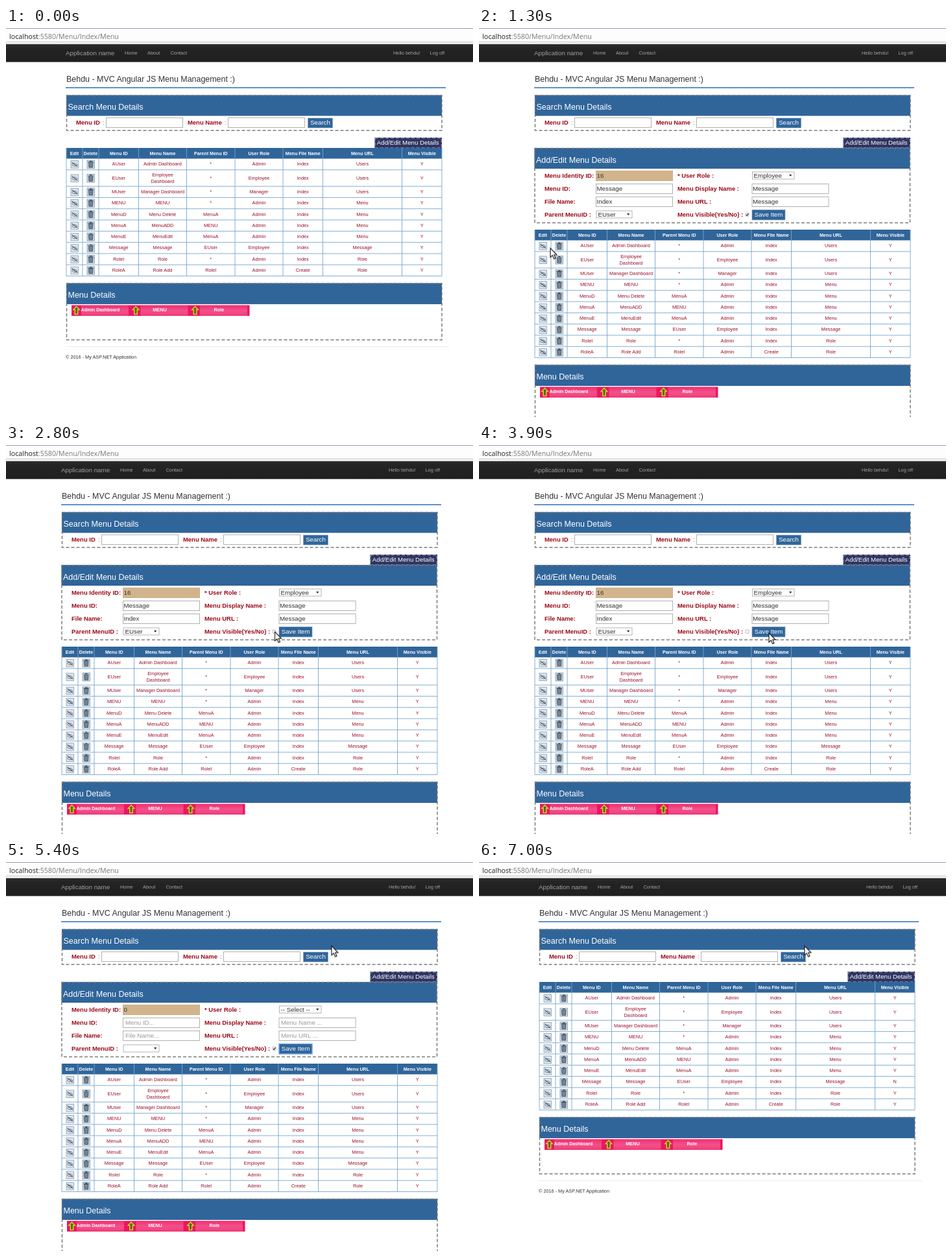
Write an HTML page that moves like this. It is 720x600 px and loops after 7100 ms.

```html
<!DOCTYPE html>
<html lang="en">
<head>
<meta charset="utf-8">
<title>Menu Management</title>
<style>
html, body { margin: 0; width: 100%; height: 100%; overflow: hidden; background: #fff; }
svg { display: block; width: 720px; height: 600px; font-family: "Liberation Sans", Arial, sans-serif; }
text { white-space: pre; }
.ui { font-family: "Open Sans", "Noto Sans CJK KR", "Noto Sans CJK JP", "Noto Sans CJK", sans-serif; }
.ko { font-family: "Noto Sans CJK KR", "Noto Sans CJK JP", "Noto Sans CJK", sans-serif; }
.b { font-weight: bold; }
.page, .lower, .form, .filled, .blank, .tick, .focus, .alert, .yes, .no { animation: 7.1s step-end infinite; }
.page { animation-name: page; }
.lower { animation-name: lower; }
.form { animation-name: form; }
.filled { animation-name: filled; }
.blank { animation-name: blank; }
.tick { animation-name: tick; }
.focus { animation-name: focus; }
.alert { animation-name: alert; }
.yes { animation-name: yes; }
.no { animation-name: no; }
.cursor { animation: cursor 7.1s ease-in-out infinite, enter 7.1s step-end infinite; }
@keyframes page { 0%, 77.3% { transform: none } 18.2% { transform: translate(-7px, 0) } }
@keyframes lower { 0%, 77.3% { transform: none } 18.2% { transform: translate(0, 126px) } }
@keyframes form { 0%, 77.3% { opacity: 0 } 18.2% { opacity: 1 } }
@keyframes filled { 0% { opacity: 1 } 74.5% { opacity: 0 } }
@keyframes blank { 0% { opacity: 0 } 74.5% { opacity: 1 } }
@keyframes tick { 0%, 74.5% { opacity: 1 } 37.9% { opacity: 0 } }
@keyframes focus { 0% { opacity: 0 } 57.6% { opacity: 1 } }
@keyframes alert { 0%, 74.5% { opacity: 0 } 59% { opacity: 1 } }
@keyframes yes { 0% { opacity: 1 } 77.3% { opacity: 0 } }
@keyframes no { 0% { opacity: 0 } 77.3% { opacity: 1 } }
@keyframes enter { 0% { opacity: 0 } 7% { opacity: 1 } }
@keyframes cursor {
  0%, 7% { transform: translate(240px, 600px) }
  15%, 22% { transform: translate(110px, 339.5px) }
  36%, 41.5% { transform: translate(414.5px, 288px) }
  50%, 62.5% { transform: translate(447px, 290px) }
  72%, 100% { transform: translate(502px, 129.5px) }
}
</style>
</head>
<body>
<script>
const BLUE = '#30659a', RED = '#9b0f2c', LABEL = '#9c0a18', NAVY = '#2f3562';

const attrs = o => Object.entries(o).map(([k, v]) => ` ${k}="${v}"`).join('');
const rect = (x, y, width, height, fill, more = {}) =>
  `<rect${attrs({ x, y, width, height, fill, ...more })}/>`;
const path = (d, stroke, w = 1, fill = 'none') =>
  `<path${attrs({ d, stroke, 'stroke-width': w, fill })}/>`;
const text = (x, y, s, size, fill, more = {}) =>
  `<text${attrs({ x, y, 'font-size': size, fill, ...more })}>${s}</text>`;
const group = (cls, ...parts) => `<g class="${cls}">${parts.join('')}</g>`;
const mid = { 'text-anchor': 'middle' }, bold = { class: 'b' };

const dashed = (x, y, w, h, color = '#7b7b7b') => rect(x, y, w, h, 'none',
  { stroke: color, 'stroke-width': 1.5, 'stroke-dasharray': '5 3' });
const panel = (x, y, h, title, head = 32) =>
  rect(x, y, 579, head, BLUE) + dashed(x + .5, y + .5, 578.5, h) +
  text(x + 2.5, y + 22.5, title, 12.5, '#fff');
const label = (x, y, s) => text(x, y, s, 9.45, LABEL, bold);
const input = (x, y, fill = '#fff') =>
  rect(x + .5, y + .5, 118, 15, fill, { stroke: fill === '#fff' ? '#b0b0b0' : '#cbb08c' });
const select = (x, y, w) =>
  rect(x + .5, y + .5, w, 11, '#fff', { stroke: '#b4b4b4' }) +
  path(`M${x + w - 7.5} ${y + 4.5}h4.4l-2.2 3z`, 'none', 0, '#333');
const button = (x, y, w, h, s) =>
  rect(x, y, w, h, BLUE, { stroke: '#7d9fc2', 'stroke-width': .7 }) +
  text(x + w / 2, y + 10.4, s, 9.7, '#fff', mid);

function addressBar() {
  return rect(0, 0, 720, 22, '#fdfdfd') + rect(0, 0, 720, 1.2, '#a9a3b8') +
    rect(0, 20.5, 720, 1, '#cfcfd6') + rect(0, 21.5, 720, 3.5, '#e9e9ea') +
    text(5, 17, 'localhost<tspan fill="#777">:5580/Menu/Index/Menu</tspan>', 10.7, '#222', { class: 'ui' }) +
    rect(0, 25, 720, 27.5, 'url(#nav)');
}

function pageHead() {
  const link = (x, s) => text(x, 41, s, 7.4, '#a3a3a3');
  return text(92, 41.5, 'Application name', 9.8, '#a0a0a0') +
    link(183, 'Home') + link(218, 'About') + link(253.5, 'Contact') +
    link(597, 'Hello behdu!') + link(653.5, 'Log off') +
    text(93, 82.5, 'Behdu - MVC Angular JS Menu Management :)', 12.45, '#333') +
    rect(92, 91.2, 586, 1.8, '#5186c4') +
    panel(93, 103.5, 54, 'Search Menu Details') +
    label(108, 149.3, 'Menu ID') + text(149, 149.3, ':', 9.5, '#777') + input(154, 138) +
    label(280, 149.3, 'Menu Name') + text(337, 149.3, ':', 9.5, '#777') + input(342, 138) +
    button(465.5, 139, 38, 15, 'Search') +
    rect(568.5, 169, 103.5, 16, NAVY) + dashed(569, 169.5, 102.5, 15.5, '#8f93a8') +
    text(571.8, 179.8, 'Add/Edit Menu Details', 9.7, '#fff');
}

const columns = [93, 118, 143, 204.5, 278.5, 353, 427, 488.5, 610.5, 672];
const centers = columns.slice(1).map((x, i) => (x + columns[i]) / 2);
const heads = ['Edit', 'Delete', 'Menu ID', 'Menu Name', 'Parent Menu ID', 'User Role',
  'Menu File Name', 'Menu URL', 'Menu Visible'];
const rows = [
  'AUser|Admin Dashboard|*|Admin|Index|Users',
  'EUser|Employee/Dashboard|*|Employee|Index|Users',
  'MUser|Manager Dashboard|*|Manager|Index|Users',
  'MENU|MENU|*|Admin|Index|Menu',
  'MenuD|Menu Delete|MenuA|Admin|Index|Menu',
  'MenuA|MenuADD|MENU|Admin|Index|Menu',
  'MenuE|MenuEdit|MenuA|Admin|Index|Menu',
  'Message|Message|EUser|Employee|Index|Message',
  'RoleI|Role|*|Admin|Index|Role',
  'RoleA|Role Add|RoleI|Admin|Create|Role'
].map(r => r.split('|'));

const editIcon = (x, y) => `<g transform="translate(${x} ${y})">` +
  rect(-5.5, -5.5, 11.5, 11.5, '#dce4ec', { stroke: '#93a3b3', 'stroke-width': .9 }) +
  path('M-4 .8Q0-4 4.5 1Q0 5-4 .8', '#65788c', 1) + path('M-4-3L4.5 3.5', '#4c6075', 1.3) + '</g>';
const binIcon = (x, y) => `<g transform="translate(${x} ${y})">` +
  rect(-5.5, -6, 11.5, 12.5, '#cdd8e2', { stroke: '#93a3b3', 'stroke-width': .9 }) +
  path('M-4-3.5H4.5M-1.5-4.8H2', '#43566a', 1.2) +
  path('M-3-2.2H3.5L3 4.8H-2.5Z', '#43566a', 1, '#8c9cac') + path('M-.8-1V4M1.4-1V4', '#43566a', .8) + '</g>';

function menuTable() {
  let y = 201.5, out = rect(93, 185, 579, 16.5, BLUE), lines = '';
  heads.forEach((h, i) => out += text(centers[i], 195.6, h, 7.1, '#fff', { ...mid, ...bold }));
  rows.forEach((row, n) => {
    const h = n === 1 ? 25.4 : 17.29, c = y + h / 2;
    const cell = (i, dy, s, more) => text(centers[i], c + 2.2 + dy, s, 7.35, RED, { ...mid, ...more });
    out += editIcon(centers[0], c) + binIcon(centers[1], c);
    row.forEach((s, i) => {
      const parts = s.split('/');
      parts.forEach((p, k) => out += cell(i + 2, (k - (parts.length - 1) / 2) * 10, p));
    });
    out += row[0] === 'Message'
      ? cell(8, 0, 'Y', { class: 'yes' }) + cell(8, 0, 'N', { class: 'no' })
      : cell(8, 0, 'Y');
    y += h;
    lines += `M93 ${y}H672`;
  });
  columns.forEach(x => lines += `M${x} 185V${y}`);
  return out + path(lines, '#78a5cf', .9);
}

function menuPanel() {
  let out = panel(93, 393.5, 87, 'Menu Details', 32.5) + rect(101, 427.5, 274.5, 16.5, '#ec1561');
  ['Admin Dashboard', 'MENU', 'Role'].forEach((s, i) => {
    const x = 101 + i * 91.5;
    out += rect(x + 15, 428, 73, 15.5, 'url(#pink)') +
      path(`M${x + 7.5} 429.5l4.7 5h-2.5v7h-4.4v-7h-2.5z`, '#bfdc1c', 1.5, '#6d5a1c') +
      text(x + 44.5, 436.8, s, i ? 7.3 : 6.9, '#fff', { ...mid, ...bold });
  });
  return out + rect(92, 491, 591, .8, '#e6e6e6') +
    text(92, 510, '© 2016 - My ASP.NET Application', 7.3, '#333');
}

function editForm() {
  const val = (x, y, s) => text(x, y, s, 9.75, '#333');
  const hint = (x, y, s) => text(x, y, s, 9.7, '#999');
  return panel(85.5, 185, 115, 'Add/Edit Menu Details') +
    label(101, 230.8, 'Menu Identity ID:') + label(306, 230.8, '* User Role :') +
    label(101, 251, 'Menu ID:') + label(306, 251, 'Menu Display Name :') +
    label(101, 271, 'File Name:') + label(306, 271, 'Menu URL :') +
    label(101, 291, 'Parent MenuID :') + label(306, 291, 'Menu Visible(Yes/No) :') +
    input(180, 220, '#d2b48c') + input(180, 240) + input(180, 260) +
    input(420.5, 240) + input(420.5, 260) +
    select(421, 221.5, 64.5) + select(180.5, 281.5, 55) +
    rect(411, 285.3, 5, 5, '#fbfbfb', { stroke: '#aaa', 'stroke-width': .8, rx: .8 }) +
    group('tick', path('M412 287.8l1.2 1.5 2.2-3.2', '#222', 1.1)) +
    button(421, 280.5, 51, 15.5, 'Save Item') +
    group('focus', rect(421, 280.5, 51, 15.5, 'none', { stroke: '#6fa8e8', 'stroke-width': 1.3 })) +
    group('filled', val(181.5, 231, '16'), val(181.5, 251, 'Message'), val(181.5, 271, 'Index'),
      val(183.5, 291, 'EUser'), val(423.5, 230.8, 'Employee'), val(422, 251, 'Message'), val(422, 271, 'Message')) +
    group('blank', val(181.5, 231, '0'), hint(184, 251, 'Menu ID...'), hint(184, 271, 'File Name...'),
      val(423.5, 230.8, '-- Select --'), hint(424, 251, 'Menu Name ...'), hint(424, 271, 'Menu URL ...'));
}

function dialog() {
  const ui = { class: 'ui' }, ko = { class: 'ko' };
  return rect(229, 24, 317.5, 132.5, '#fff', { filter: 'url(#shade)', stroke: '#c4c4c4', 'stroke-width': .8 }) +
    text(242, 46, 'localhost:5580', 11.7, '#333', ui) + text(327, 46, '내용:', 13.2, '#333', ko) +
    path('M534 33.5l4.6 4.6m0-4.6l-4.6 4.6', '#666', 1.3) +
    text(243, 77.5, 'updated', 10.1, '#333', ui) +
    rect(244.5, 89, 8.5, 8.5, '#fcfcfc', { stroke: '#aaa', rx: 1.2 }) +
    text(258, 97, '이 페이지가 추가적인 대화를 생성하지 않도록 차단합니다.', 11.55, '#333', ko) +
    rect(482, 118, 48.5, 22.5, '#f6f7f9', { stroke: '#4f8fdc', 'stroke-width': 1.4, rx: 1.5 }) +
    text(506.5, 132.8, '확인', 11.8, '#222', { ...mid, class: 'ko', 'font-weight': 500 });
}

document.body.innerHTML = `<svg viewBox="0 0 720 600">
<defs>
<linearGradient id="nav" x2="0" y2="1"><stop stop-color="#2d2d2d"/><stop offset=".2" stop-color="#242424"/><stop offset="1" stop-color="#1f1f1f"/></linearGradient>
<linearGradient id="pink" x2="0" y2="1"><stop stop-color="#f0306f"/><stop offset=".5" stop-color="#f4508a"/><stop offset="1" stop-color="#f0407b"/></linearGradient>
<filter id="shade" x="-10%" y="-10%" width="120%" height="125%"><feDropShadow dx="0" dy="2" stdDeviation="3" flood-opacity=".35"/></filter>
</defs>` +
  addressBar() +
  group('page', pageHead(), group('lower', menuTable(), menuPanel())) +
  group('form', editForm()) +
  group('alert', dialog()) +
  group('cursor', path('M0 0V14.2L3.3 11.2 5.6 16.6 8 15.6 5.7 10.3H10Z', '#111', 1.1, '#fff')) +
  '</svg>';
</script>
</body>
</html>
```
